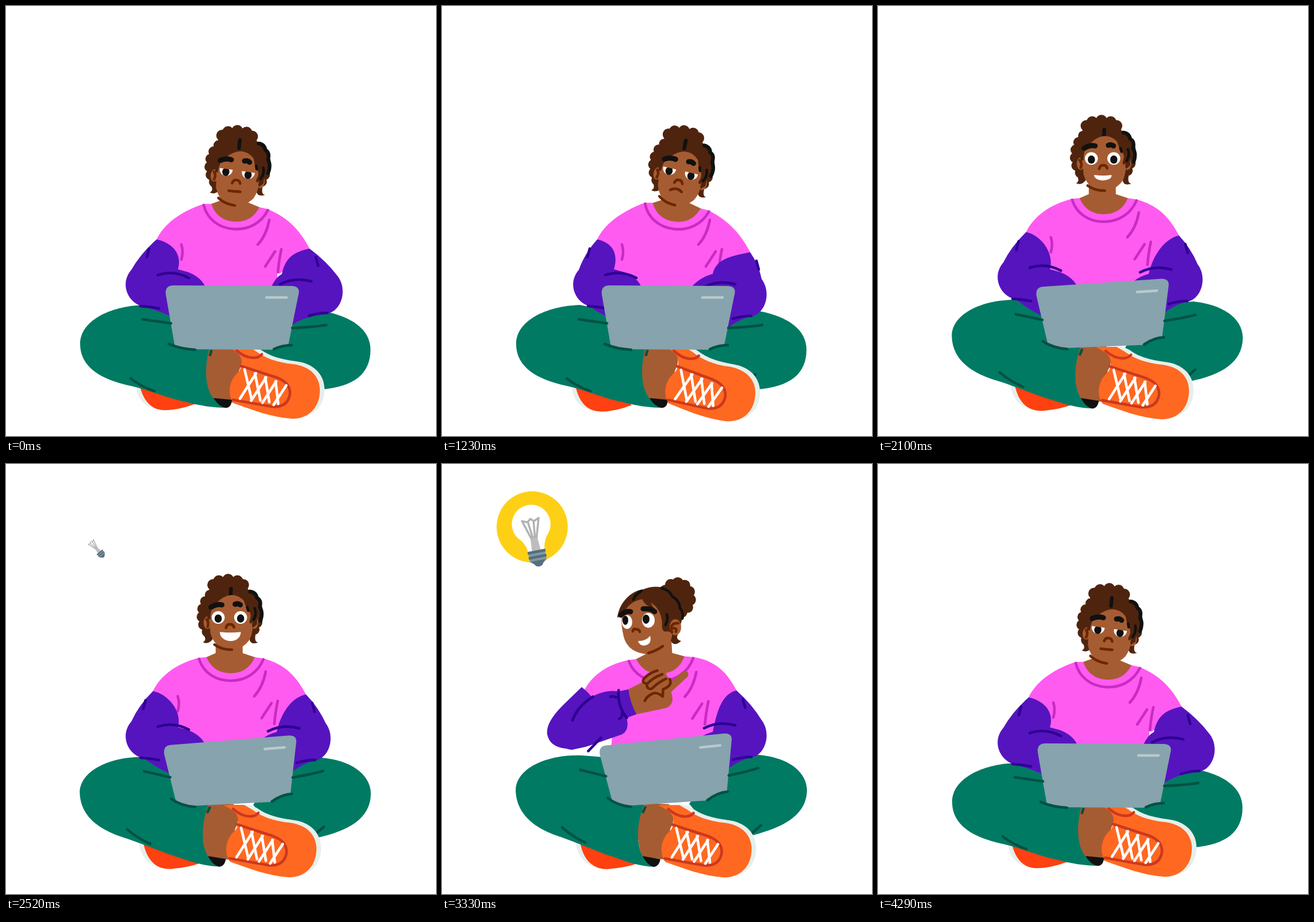
Write an HTML page that moves like this. It is 748 px wide and 748 px high and loops after 4.32 s.

```html
<!DOCTYPE html>
<html lang="en">
<head>
<meta charset="utf-8">
<title>Bright idea</title>
<style>
  html, body { margin: 0; width: 100%; height: 100%; overflow: hidden; background: #fff; }
  svg { display: block; width: 100vw; height: 100vh; }
  .line { fill: none; stroke-width: 4.6; stroke-linecap: round; stroke-linejoin: round; }
  .skin { fill: #a65c32; }
  .hair { fill: #4f240e; }
  .green { fill: #007a63; }
  .purple { fill: #5614be; }
  .pink { fill: #ff5bf0; }
  .white { fill: #fff; }
  .sole { fill: #e6efec; }
  .black { fill: #111; }
  .brown { stroke: #6b2700; }
  .ink { stroke: #111; }
  .moss { stroke: #045143; }
  .indigo { stroke: #2f0093; }
  .rose { stroke: #c92bc4; }
  .rust { stroke: #cb3820; }
</style>
</head>
<body>
<svg viewBox="0 0 748 748">
  <g id="backShoe">
    <path class="sole" d="M226 662C229 688 246 702 276 703L300 670Z" data-up="M232 652C235 684 255 704 284 705L300 675Z"/>
    <path fill="#ff4010" d="M233 662C240 690 255 704 280 703C300 702 315 697 330 692L300 665Z" data-up="M241 655C246 690 265 706 290 705C310 703 330 700 342 695L300 670Z"/>
  </g>

  <path id="shirt" class="pink"/>
  <g id="folds"><path class="line rose" d="M-92 40Q-88 52 -92 66M61 -3Q56 24 41 40M71 52L54 78M82 48Q78 66 76 88"/></g>
  <g id="collar">
    <path class="skin" d="M-42 -28L-26 -35V-75H21V-35L42 -28Q30 0 0 0Q-30 0 -42 -28Z"/>
    <path class="line rose" d="M-55 -25C-47 0 -25 13 0 13C25 13 47 0 57 -24"/>
  </g>

  <path class="green" d="M430 600L480 530L553 531C600 540 634 562 634 598C634 640 605 662 550 667L480 660Z" data-up="M430 590L480 514L545 502C597 504 634 528 635 563C634 608 590 628 538 643L480 650Z"/>
  <path class="green" d="M330 540L290 530L240 520C180 522 129 548 129 588C129 640 190 655 222 662C260 672 282 682 310 688C336 695 360 699 385 699L362 683C350 665 345 640 356 598Z" data-up="M330 540L290 508L245 505C180 502 128 528 128 565C130 614 172 636 205 647C245 662 274 676 300 684C326 694 345 700 368 701L348 683C338 665 335 640 352 596Z"/>
  <path class="line moss" d="M530 654L545 641" data-up="M541 640L556 627"/>

  <g id="typingArm">
    <path id="armL" class="purple"/>
    <path id="armLFolds" class="line indigo"/>
  </g>
  <path id="armR" class="purple"/>
  <path id="armRFolds" class="line indigo"/>

  <g id="raisedArm">
    <path class="purple" d="M243 388Q273 412 284 450L262 475Q245 495 215 495Q187 492 183 470Q180 450 210 420Z"/>
    <g id="forearm">
      <path class="skin" d="M183 275H198Q212 278 212 294V348H167L160 322C145 314 139 292 145 284Q150 276 158 277Q165 268 176 276Z"/>
      <path d="M161 246L184 284" class="line" style="stroke:#a65c32;stroke-width:13"/>
      <path class="line brown" d="M145 291Q146 305 154 317Q160 322 163 315M153 284Q155 300 164 313Q171 317 174 309M162 279Q164 292 174 307M164 273Q176 270 179 288L191 291Q180 300 183 309Q186 319 192 323"/>
      <path class="purple" d="M167 347Q190 349 212 342L215 360Q240 359 242 378L250 440V465Q240 492 215 495Q188 495 183 470L165 405Q160 382 167 365Z"/>
      <path class="line indigo" d="M165 364Q190 372 215 360M176 371Q173 374 173 380M205 366Q213 367 214 373M167 410Q178 440 200 453M240 411L258 437"/>
    </g>
  </g>

  <path class="skin" d="M355 590L400 590C412 605 414 618 405 635L396 690L362 684C346 665 344 630 355 590Z" data-up="M352 590L394 592C404 608 404 622 396 634L388 688L348 684C336 660 337 625 352 590Z"/>
  <path class="black" d="M361 682L393 685Q392 699 382 699Q370 697 361 682Z" data-up="M347 682L378 688Q375 701 366 701Q356 699 347 682Z"/>
  <g id="shoe">
    <path class="sole" d="M414 592Q432 589 448 601C470 615 495 616 515 620C545 628 555 650 554 670C553 695 535 718 498 718Z"/>
    <path fill="#ff6820" d="M398 600L384 592H420L434 600C450 612 470 620 500 623C530 627 546 645 546 668C546 700 525 718 498 718C460 715 430 703 396 691C384 675 388 650 405 636C413 625 412 608 398 600Z"/>
    <path class="line rust" d="M401 599Q416 612 430 612Q440 612 445 606M408 626L470 646Q495 655 494 675Q490 699 463 697L395 685"/>
    <path id="laces" class="line" stroke="#fff"/>
  </g>

  <path fill="#87a3ad" d="M290 486L498 487Q512 488 509 501L492 585Q490 598 478 598L304 597Q295 597 293 588L278 502Q276 487 290 486Z" data-up="M285 490L490 466Q504 465 503 478L496 568Q488 582 464 583L312 595Q300 596 297 588L274 506Q272 491 285 490Z"/>
  <path class="line" stroke="#b9c9cc" d="M453 507L488 507" data-up="M449 491L483 487"/>
  <path class="green" d="M284 589Q305 598 329 599Q322 611 306 609Q296 606 284 589ZM466 597Q480 590 497 590L496 602L476 602Z" data-up="M289 581Q305 595 329 597Q322 607 308 605Q298 601 289 581ZM461 583Q480 568 497 567L502 586L476 592Z"/>
  <path class="line moss" d="M238 545L287 552M498 560Q530 559 557 555M283 588Q305 597 329 598M466 597Q480 590 497 590M217 648Q235 662 258 670M357 600L355 607" data-up="M241 530L285 542M499 539Q530 532 549 525M289 580Q305 594 329 596M461 583Q480 568 497 567M208 630Q225 646 248 657M353 597L349 605"/>

  <g id="front">
    <g id="curls">
      <g id="bumps" class="hair"></g>
      <path class="hair" d="M-40 -36L-30 -60H26L36 -44L48 -10Q48 20 36 24H-40Q-48 0 -40 -36ZM-50 14C-44 34 -38 38 -46 43Q-36 48 -28 36L-30 14ZM34 14L50 14C44 32 42 42 50 44Q36 48 35 38Z"/>
      <path class="line ink" style="stroke-width:6.5" d="M36 -45Q46 -44 48 -34Q56 -30 53 -18Q59 -8 54 6M3 -50L2 -36"/>
    </g>
    <g id="face">
      <ellipse class="skin" cx="-38" cy="9" rx="7" ry="11"/>
      <ellipse class="skin" cx="43" cy="9" rx="7" ry="11"/>
      <path class="skin" d="M-36 -6C-28 -22 -12 -39 4 -39C22 -39 34 -22 40 -2C42 15 40 30 34 40C24 52 12 58 2 57C-16 56 -28 45 -33 28Z"/>
      <path class="line brown" d="M-40 3Q-35 8 -38 16M46 4Q42 7 42 14M-6 18Q-4 11 1 12Q6 11 8 17M-26 47Q-14 56 4 56"/>
      <g id="eyes"></g>
      <path class="hair" d="M24 -36Q50 -28 48 12L41 18Q38 14 41 8Q34 14 35 6Q40 -6 33 -12Q26 -22 24 -36ZM-40 -10L-28 -22Q-34 -8 -33 4Q-36 0 -37 8Z"/>
      <path class="line ink" d="M44 -16Q48 -6 42 4M31 -18L33 -12"/>
      <path class="line ink" style="stroke-width:9" d="M-32 -18Q-22 -24 -13 -22M10 -23Q15 -25 19 -22"/>
      <path id="frown" class="line brown"/>
      <path id="smile" class="white" stroke="#fff" stroke-width="1.5" stroke-linejoin="round"/>
    </g>
  </g>

  <g id="turned">
    <g id="bun" class="hair"><ellipse cx="404" cy="234" rx="24" ry="27"/></g>
    <path class="hair" d="M300 268C303 244 322 222 345 219Q372 209 394 222Q414 238 414 266L406 296Q400 306 411 309Q398 320 393 308L374 300L320 262Z"/>
    <ellipse class="skin" cx="401" cy="285" rx="10" ry="14"/>
    <path class="skin" d="M308 266C316 246 330 238 345 236C364 242 376 254 378 278Q376 296 388 292L396 295Q394 316 378 322Q362 333 346 331C326 328 313 316 310 296Q306 282 308 266Z"/>
    <ellipse class="white" cx="317" cy="276" rx="9" ry="12"/>
    <ellipse class="black" cx="314" cy="273" rx="5" ry="8"/>
    <ellipse class="white" cx="354" cy="273" rx="11" ry="13"/>
    <ellipse class="black" cx="350" cy="271" rx="6" ry="8"/>
    <path class="hair" d="M342 232Q346 248 364 252Q357 243 358 236Z"/>
    <path class="line ink" d="M342 222Q331 228 328 237M386 263Q389 271 384 281"/>
    <path class="line ink" d="M377 217Q391 220 396 232Q408 238 409 252Q416 260 413 270"/>
    <path class="line ink" style="stroke-width:9" d="M306 264Q314 256 323 258M345 253Q358 252 365 258"/>
    <path class="line brown" d="M327 292Q328 286 333 289Q338 288 339 293M354 330Q368 326 379 318M395 294Q390 277 406 278M398 287Q404 286 402 293"/>
    <path class="white" d="M336 309Q350 309 357 300Q361 315 346 317Q338 316 336 309Z"/>
  </g>

  <circle id="glow" fill="#fdd016"/>
  <g id="bulb">
    <path class="white" d="M-15 50Q-15 38 -23 26A34.5 34.5 0 1 1 23 26Q15 38 15 50Z"/>
    <path fill="#bdbdbd" d="M-6 22H6L8 50H-8Z"/>
    <path class="line" stroke="#b0b2b4" style="stroke-width:3.6" d="M-5 25L-15 -8L-6 -4L0 -9L6 -4L15 -8L5 25M-2 24L-5 -3M2 24L5 -3"/>
    <path fill="#8298a3" d="M-15 48H15V67L9 71H-9L-15 67Z"/>
    <path fill="#566f7d" d="M-16 48H16V53H-16ZM-16 57H16V62H-16ZM-13 66H13L8 72Q6 77 0 77Q-6 77 -8 72Z"/>
  </g>
</svg>
<script>
const LOOP = 4320, STEP = 30;
const $ = id => document.getElementById(id);
const set = (id, name, value) => $(id).setAttribute(name, value);
const show = (id, on) => set(id, 'visibility', on ? 'visible' : 'hidden');
const lerp = (a, b, k) => a + (b - a) * k;
const ramp = (t, from, to) => Math.min(1, Math.max(0, (t - from) / (to - from)));
const ease = k => k * k * (3 - 2 * k);
const back = (k, over) => 1 + (over + 1) * (k - 1) ** 3 + over * (k - 1) ** 2;

const NUM = /-?[\d.]+/g;
function morph(from, to, k) {
  const goal = to.match(NUM);
  let i = 0;
  return from.replace(NUM, n => ' ' + lerp(+n, +goal[i++], k).toFixed(2));
}

// x, y: foot of the neck; lift: legs and laptop; bow: head down, eyes half shut
const bored = { x: 397, y: 375, tilt: 8, lift: 0, bow: 1, frown: 0, smile: 0 };
const sigh = { ...bored, x: 405, tilt: 13, frown: 1 };
const alert = { ...bored, x: 393, y: 371, tilt: 0, lift: .57, bow: 0 };
const peak = { ...alert, y: 362, smile: .4 };
const happy = { ...alert, x: 391, y: 364, lift: .7, smile: 1 };
const look = { ...happy, x: 384, tilt: -5, lift: .77 };
const point = { ...look, x: 378, y: 366, tilt: -8, lift: 1 };
const plan = [[0, bored], [660, sigh], [1350, sigh], [1740, alert], [1980, peak], [2460, happy],
  [3000, look], [3150, look], [3540, point], [3780, point], [4230, bored], [LOOP, bored]];

function poseAt(t) {
  const i = plan.findIndex(([end]) => end > t);
  const [t0, a] = plan[i - 1], [t1, b] = plan[i];
  const k = ease(ramp(t, t0, t1)), pose = {};
  for (const key in a) pose[key] = lerp(a[key], b[key], k);
  return pose;
}

// curls: n circles of radius r along an elliptic arc, angles in degrees
function ring(id, cx, cy, rx, ry, from, to, n, r) {
  for (let i = 0; i < n; i++) {
    const a = lerp(from, to, i / (n - 1)) * Math.PI / 180;
    $(id).innerHTML += `<circle cx="${cx + rx * Math.cos(a)}" cy="${cy + ry * Math.sin(a)}" r="${r}"/>`;
  }
}
ring('bumps', -2, -52, 28, 14, 200, 340, 5, 10);
ring('bumps', 1, -4, 49, 50, 225, 145, 6, 9);
ring('bumps', 1, -4, 49, 50, -45, 30, 6, 9);
ring('bun', 404, 234, 23, 26, -150, 70, 8, 10);

let laces = '';
for (let i = 0; i < 4; i++) {
  laces += `M${415 + 18 * i} ${632 + 7 * i}L${427 + 15.5 * i} ${683 + 3 * i}`;
  laces += `M${435 + 17.5 * i} ${639 + 7 * i}L${407 + 19.5 * i} ${683 + 3.6 * i}`;
}
set('laces', 'd', laces);

$('eyes').innerHTML = [-19.5, 19.5].map(x =>
  `<ellipse class="white" cx="${x}" rx="11.3" ry="11"/><ellipse class="black" cx="${x}" rx="6.3" ry="7.2"/>` +
  `<rect class="skin" x="${x - 12}" y="-16" width="24"/>`).join('');
const eachEye = (part, name, value) =>
  document.querySelectorAll('#eyes ' + part).forEach(el => el.setAttribute(name, value));
const lifted = [...document.querySelectorAll('[data-up]')].map(el => [el, el.getAttribute('d'), el.dataset.up]);

function drawTorso({ x, y, tilt }) {
  const turn = tilt / 2, a = turn * Math.PI / 180;
  const neck = (u, v) => `${x + u * Math.cos(a) - v * Math.sin(a)} ${y + u * Math.sin(a) + v * Math.cos(a)}`;
  const lx = x - 135, ly = y + 31, rx = x + 131, ry = y + 37 + 2.5 * turn;
  set('shirt', 'd', `M${neck(-55, -27)}C${lx + 38} ${ly - 47} ${lx + 12} ${ly - 25} ${lx} ${ly}
    Q${lx + 28} ${ly + 25} 283 451L298 440L294 500H472V463L476 466L${rx} ${ry}
    C${rx - 14} ${ry - 26} ${rx - 32} ${ry - 52} ${neck(56, -26)}L${neck(42, -28)}L${neck(-42, -28)}Z`);
  set('folds', 'transform', `translate(${x} ${y})`);
  set('collar', 'transform', `translate(${x} ${y}) rotate(${turn})`);
  return { lx, ly, rx, ry, turn };
}

function drawArms({ y, bow, frown }, { lx, ly, rx, ry, turn }) {
  const ex = 206 + 20 * frown, ey = y + 112;
  const spread = bow * (1 - frown);
  const gx = 566 + 21 * spread, gy = y + 115 + 2 * turn;
  const pit = 471 + 9 * spread, wrist = 433 + 28 * spread;

  set('armL', 'd', `M${lx} ${ly}C${lx + 28} ${ly + 6} 307 432 299 458L317 463Q342 473 348 492L288 540
    Q264 530 ${ex + 34} ${ey + 36}C${ex + 6} ${ey + 31} ${ex - 9} ${ey - 4} ${ex + 12} ${ey - 28}
    Q${(lx + ex) / 2} ${(ly + ey) / 2 - 16} ${lx} ${ly}Z`);
  set('armLFolds', 'd', `M${lx - 13} ${ly + 16}L${lx - 17} ${ly + 31}M${ex + 58} ${ey - 19}
    Q${ex + 86} ${ey - 28} ${ex + 112} ${ey - 14}M${ex + 28} ${ey + 35}Q${ex + 44} ${ey + 36} ${ex + 60} ${ey + 39}`);
  set('armR', 'd', `M${rx} ${ry}C${rx - 28} ${ry + 6} ${pit + 6} 438 ${pit} 466
    Q${lerp(wrist, pit, .4)} 472 ${wrist} 490L492 ${gy + 61}
    Q515 ${gy + 42} ${gx - 28} ${gy + 37}C${gx - 4} ${gy + 33} ${gx + 8} ${gy - 4} ${gx - 10} ${gy - 28}
    Q${(rx + gx) / 2} ${(ry + gy) / 2 - 16} ${rx} ${ry}Z`);
  set('armRFolds', 'd', `M${rx + 11} ${ry + 15}L${rx + 15} ${ry + 30}M${gx - 110} ${gy - 14}
    Q${gx - 85} ${gy - 27} ${gx - 56} ${gy - 19}M${gx - 60} ${gy + 41}Q${gx - 44} ${gy + 36} ${gx - 28} ${gy + 36}`);
}

function drawHead({ x, y, tilt, bow, frown, smile }, isTurned, isBored) {
  const hx = x - 2 + .85 * tilt, hy = y - 97 + 13 * bow;
  show('front', !isTurned);
  show('turned', isTurned);
  set('turned', 'transform', `translate(${hx - 369} ${hy - 269})`);
  set('front', 'transform', `translate(${hx} ${hy})`);
  set('curls', 'transform', `rotate(${tilt - 6 * bow}) translate(0 ${-8 * bow})`);
  set('face', 'transform', `rotate(${tilt})`);

  eachEye('.white', 'cy', -4 * bow);
  eachEye('.black', 'cy', 1.8 - 1.6 * bow);
  eachEye('rect', 'height', 4 + 7 * bow);

  $('frown').style.display = isBored ? '' : 'none';
  $('smile').style.display = isBored ? 'none' : '';
  set('frown', 'd', `M-10 32Q0 ${32 - 8 * frown} 10 31`);
  const l = -12 - 4 * smile, r = 11 + 8 * smile, top = 33 - 7 * smile, low = top + 2 + 17 * smile;
  set('smile', 'd', `M${l} ${top}Q1 ${top + 2} ${r} ${top}C${r - 1} ${low} ${l + 2} ${low} ${l} ${top}Z`);
}

function drawLegs(t, lift) {
  const tap = t < 1380 ? 6 * Math.sin(Math.PI * t / 690) ** 2 : 0;
  for (const [el, from, to] of lifted) el.setAttribute('d', morph(from, to, lift));
  set('shoe', 'transform', `translate(${-8.5 * lift} ${1.5 * lift}) rotate(${tap} 390 650)`);
  set('backShoe', 'transform', `translate(0 ${tap})`);
}

function drawBulb(t) {
  const leaving = t > 3780;
  const pop = (from, length, over) =>
    leaving ? back(1 - ramp(t, 3780, 4110), 2.2) : back(ramp(t, from, from + length), over);
  const drift = ease(ramp(t, 3150, 3540));
  const size = Math.max(0, pop(2460, 570, 1.7)), small = 1 - size;
  set('bulb', 'transform', `translate(${lerp(160, 149, drift) - 18 * small} ${lerp(106, 102, drift) + 56 * small})
    rotate(${-11 - 52 * small}) scale(${size * lerp(.96, 1, drift)})`);
  set('glow', 'cx', lerp(160, 153, drift));
  set('glow', 'cy', lerp(108, 111, drift));
  set('glow', 'r', Math.max(0, lerp(61, 63, drift) * pop(2540, 460, 4.5)));
}

const start = performance.now();
function frame() {
  const t = Math.floor(((performance.now() - start) % LOOP) / STEP) * STEP;
  const pose = poseAt(t);
  const raised = t >= 3240 && t < 4020;
  const raise = ease(ramp(t, 3240, 3540)) - ease(ramp(t, 3780, 4020));
  drawArms(pose, drawTorso(pose));
  show('typingArm', !raised);
  show('raisedArm', raised);
  set('forearm', 'transform', `rotate(${100 * (1 - raise)} 218 466)`);
  drawLegs(t, pose.lift);
  drawHead(pose, t >= 3330 && t < 3960, t < 1560 || t >= 4080);
  drawBulb(t);
  requestAnimationFrame(frame);
}
frame();
</script>
</body>
</html>
```
